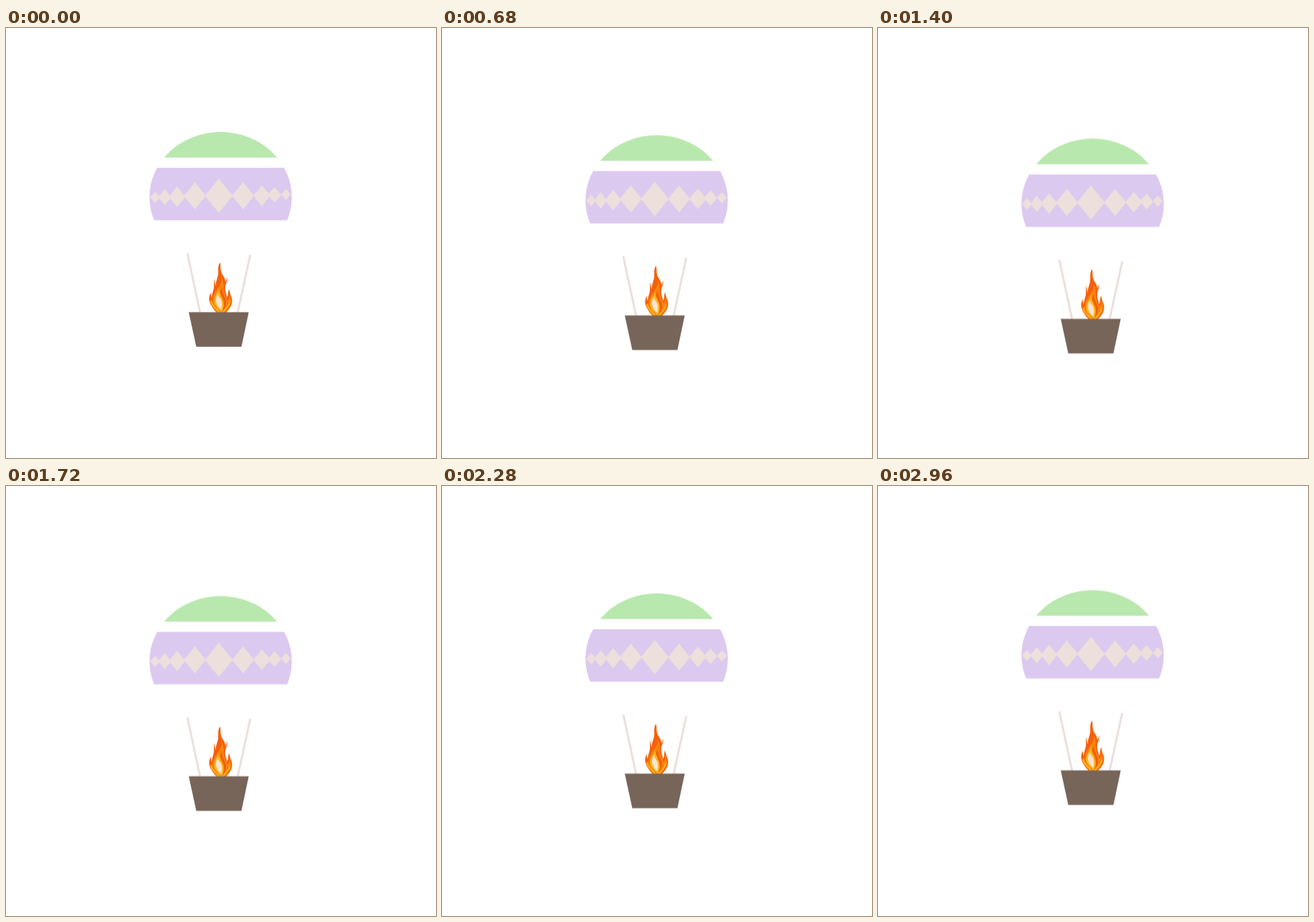
These frames come from a looping animation (600 by 600 pixels, 3000 ms). An HTML page without scripts:

```html
<!DOCTYPE html>
<html lang="en">
<head>
<meta charset="utf-8">
<title>Hot air balloon</title>
<style>
  html, body { margin: 0; width: 100%; height: 100%; overflow: hidden; background: #fff; }
  svg { display: block; width: 100%; height: 100%; }
  .balloon { animation: drift 3s linear infinite; }
  @keyframes drift {
    50% { transform: translateY(10px); }
  }
</style>
</head>
<body>
<svg viewBox="0 0 600 600">
  <defs>
    <clipPath id="envelope"><ellipse cx="299.5" cy="236" rx="99.3" ry="91"/></clipPath>
    <path id="gem" d="M0-1L1 0L0 1L-1 0Z"/>
  </defs>

  <g class="balloon">
    <g clip-path="url(#envelope)">
      <path fill="#b9e8ae" d="M200 140H400V180.700H200Z"/>
      <path fill="#dcc9f0" d="M200 195H400V268.300H200Z"/>
    </g>

    <g fill="#ecdfdc">
      <use href="#gem" transform="translate(208 236.2) scale(7 8)"/>
      <use href="#gem" transform="translate(221.5 236) scale(9 11.5)"/>
      <use href="#gem" transform="translate(238.8 235.5) scale(11.5 14.5)"/>
      <use href="#gem" transform="translate(263.5 234) scale(15.5 19)"/>
      <use href="#gem" transform="translate(297 234) scale(19.5 24)"/>
      <use href="#gem" transform="translate(330.8 234) scale(15.5 19)"/>
      <use href="#gem" transform="translate(357 233.7) scale(12 14.5)"/>
      <use href="#gem" transform="translate(374.7 232.7) scale(9.5 11)"/>
      <use href="#gem" transform="translate(390.5 232.3) scale(7 8)"/>
    </g>

    <path fill="none" stroke="#ecdfdc" stroke-width="3" d="M253 314L271 398M340.8 316.5L323 398"/>

    <!-- flame, outside in -->
    <path fill="#f4600c" d="M298.500 327C294 334 298 341 295 348C294 352 292.500 355 292.500 360C292 357 291 354 290 350C290 357 291 361 289 367C288 370 287.500 372 287 376C286 374 285.500 372 286 369C282 375 283 382 287 388C289 392 292 395 295 398H306C311 393 316 387 315.500 379C315 374 312 371 311.500 364C309 368 311 372 308.500 376C308 371 305 368 306 361C306 357 309 355 308.500 348C307.500 351 307 353 306 354C306 347 301 345 300 339C299 334 300 331 298.500 327Z"/>
    <path fill="#fb8310" d="M300 345C306 356 302 364 306 372C308 376 308 380 310 379C312 376 311 372 312 369C312 374 315 378 313.500 382C312 389 308 394 304 398H296C291 392 285 387 285 379C287 382 288 380 289 376C290 370 294 366 297 361C300 356 303 352 300 345Z"/>
    <path fill="#f2600c" d="M302 362C300 369 306 375 307 381C308 387 305 392 302 396C304 387 303 380 299 374C297 369 299 366 302 362Z"/>
    <path fill="#fdb41c" d="M297 361C297 369 301 374 303 380C305 387 303 392 301 397C297 394 289 389 289.500 381C290 374 297 370 297 361Z"/>
    <path fill="none" stroke="#fdb51a" stroke-width="2" d="M312.500 381C312 390 305 391 302 398M286 381C287 389 295 391 298 398"/>
    <path fill="none" stroke="#f2660a" d="M290 377C287 387 296 391 300 397"/>
    <path fill="#fbe3d3" d="M295 369C296 375 300 377 301 382C302 387 301 390 300 393C296 389 293 385 293 379C293 375 295 373 295 369Z"/>

    <path fill="#77655a" d="M255 396.500H338.700L328.500 444.700H265.500Z"/>
  </g>
</svg>
</body>
</html>
```
